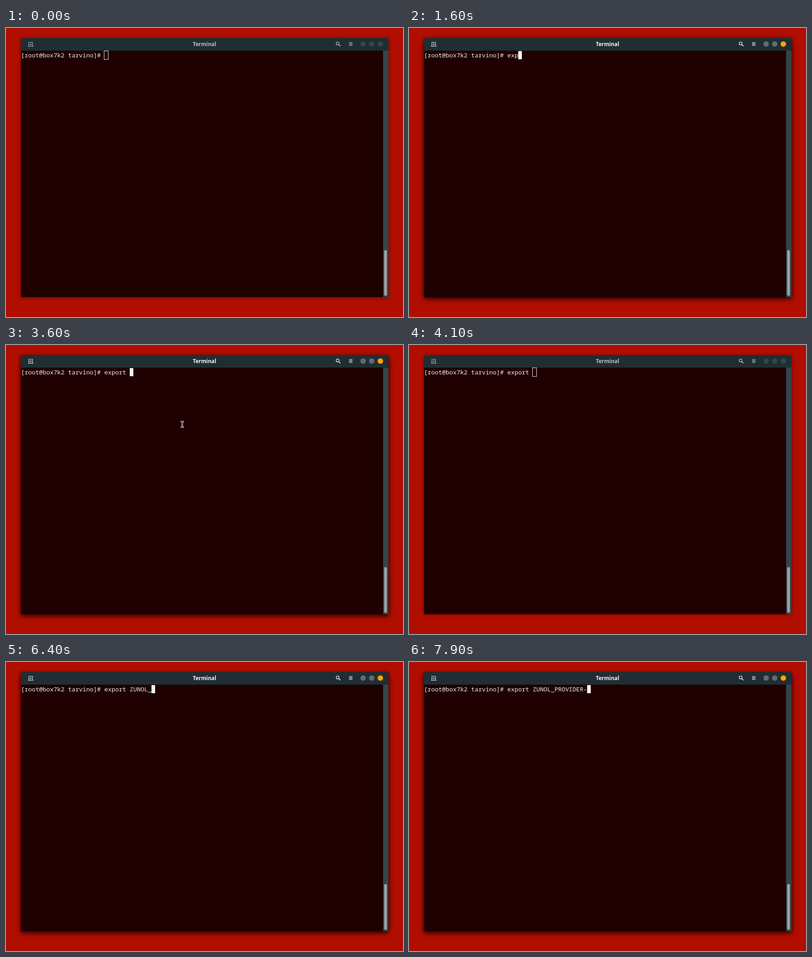
These frames come from a looping animation (876 px wide and 639 px high, 8 s). An HTML page:

```html
<!DOCTYPE html>
<html lang="en">
<head>
<meta charset="utf-8">
<title>Terminal</title>
<style>
  html, body { margin: 0; width: 100%; height: 100%; overflow: hidden; background: #b00e00; }
  svg { display: block; width: 876px; height: 639px; }
  .title { font: 700 11.7px "Open Sans", "Noto Sans", sans-serif; text-anchor: middle; }
  .line { font: 13.333px "Noto Sans Mono", "DejaVu Sans Mono", monospace; fill: #f3ece6; white-space: pre; }
</style>
</head>
<body>
<svg viewBox="0 0 876 639" xmlns="http://www.w3.org/2000/svg">
  <defs>
    <filter id="soft" x="-10%" y="-10%" width="120%" height="120%"><feGaussianBlur stdDeviation="3"/></filter>
    <filter id="wide" x="-10%" y="-10%" width="120%" height="120%"><feGaussianBlur stdDeviation="7"/></filter>
  </defs>
  <rect width="876" height="639" fill="#b00e00"/>

  <rect x="32" y="23" width="813" height="574" rx="5" opacity=".35" filter="url(#soft)"/>
  <g id="shadow">
    <rect x="33" y="28" width="811" height="573" rx="5" opacity=".38" filter="url(#wide)"/>
    <rect x="33" y="26" width="811" height="573" rx="5" opacity=".35" filter="url(#soft)"/>
  </g>

  <path d="M33 595V27q0-5 5-5H839q5 0 5 5V595z" fill="#1e0100"/>
  <path d="M33 50V27q0-5 5-5H839q5 0 5 5V50z" fill="#202e34"/>
  <rect x="832" y="50" width="12" height="545" fill="#35434a"/>
  <rect x="834.5" y="491" width="6" height="101" rx="3" fill="#9fa3a7"/>

  <text id="title" class="title" x="438" y="40">Terminal</text>
  <g id="icons" fill="none" stroke-width="1.2">
    <path d="M50.5 40V31.5H58.5V40M48.5 40.3H60.5M52.3 36H56.7M54.5 33.8V38.2"/>
    <circle cx="731.8" cy="34.2" r="3.2" stroke-width="1.5"/>
    <path d="M734.2 36.6L738 40.4" stroke-width="1.9"/>
    <path d="M757 32.5H764.5M757 35.5H764.5M757 38.5H764.5" stroke-width="1.3"/>
  </g>
  <g id="dots">
    <circle cx="788" cy="35.5" r="6"/>
    <circle cx="807" cy="35.5" r="6"/>
  </g>
  <circle id="close" cx="826" cy="35.5" r="6"/>

  <text id="line" class="line" x="33" y="65" xml:space="preserve"></text>
  <rect id="block" y="51" width="8" height="18" fill="#fff4ea"/>
  <rect id="hollow" y="50.5" width="9" height="19" fill="none" stroke="#f3ece6"/>

  <g id="pointer" fill="none">
    <path d="M-3.5-6H3.5M-3.5 6H3.5M0-6V6" stroke="#eee" stroke-width="3"/>
    <path d="M-3-6H3M-3 6H3M0-6V6" stroke="#1a0a0a" stroke-width="1.1"/>
  </g>
</svg>
<script>
const LOOP = 8000, CELL = 8, LEFT = 33, FADE = 200;
const PROMPT = "[root@box7k2 tarvino]# ";

// Each burst: text, time of the first key, time between keys
const bursts = [["export ", 1200, 150], ["ZUNOL_PROVIDER-", 5450, 170]];
const focusTimes = [[1000, 3800], [4400, LOOP]];
const blinkOff = [[2750, 3350], [4850, 5450]];
// Pointer paths: start, end, travel time, from, to
const moves = [
  [2700, 3650, 200, [380, 150], [389, 175]],
  [4500, 5450, 400, [382, 158], [375, 130]]
];

const el = id => document.getElementById(id);
const parts = Object.fromEntries(
  ["shadow", "title", "icons", "dots", "close", "line", "block", "hollow", "pointer"].map(id => [id, el(id)]));

const clamp = v => Math.max(0, Math.min(1, v));
const within = (t, [a, b]) => t >= a && t < b;
const lerp = (a, b, k) => a + (b - a) * k;
const mix = (a, b, k) => `rgb(${a.map((v, i) => Math.round(lerp(v, b[i], k)))})`;
const show = (node, on) => node.setAttribute("visibility", on ? "visible" : "hidden");

function typed(t) {
  return bursts.map(([text, start, gap]) =>
    text.slice(0, Math.max(0, Math.floor((t - start) / gap) + 1))).join("");
}

function focusLevel(t) {
  return focusTimes.reduce((k, [a, b]) =>
    k + clamp((t - a) / FADE) - clamp((t - b) / FADE), 0);
}

function draw(t) {
  const p = parts, k = focusLevel(t);
  const focused = focusTimes.some(span => within(t, span));

  p.shadow.setAttribute("opacity", k);
  p.title.setAttribute("fill", mix([184, 192, 196], [246, 247, 248], k));
  p.icons.setAttribute("stroke", mix([166, 175, 179], [214, 220, 222], k));
  p.dots.setAttribute("fill", mix([52, 69, 76], [95, 108, 115], k));
  p.close.setAttribute("fill", mix([52, 69, 76], [255, 165, 0], k));

  const text = PROMPT + typed(t), x = LEFT + text.length * CELL;
  if (p.line.textContent !== text) p.line.textContent = text;
  p.block.setAttribute("x", x);
  p.hollow.setAttribute("x", x - 0.5);
  show(p.block, focused && !blinkOff.some(span => within(t, span)));
  show(p.hollow, !focused);

  const move = moves.find(m => within(t, m));
  show(p.pointer, move);
  if (move) {
    const [start, , travel, from, to] = move;
    const e = 1 - (1 - clamp((t - start) / travel)) ** 2;
    const [px, py] = from.map((v, i) => Math.round(lerp(v, to[i], e)));
    p.pointer.setAttribute("transform", `translate(${px} ${py + 0.5})`);
  }
}

const begin = performance.now();
function tick(now) {
  draw(Math.max(0, now - begin) % LOOP);
  requestAnimationFrame(tick);
}
draw(0);
requestAnimationFrame(tick);
</script>
</body>
</html>
```
